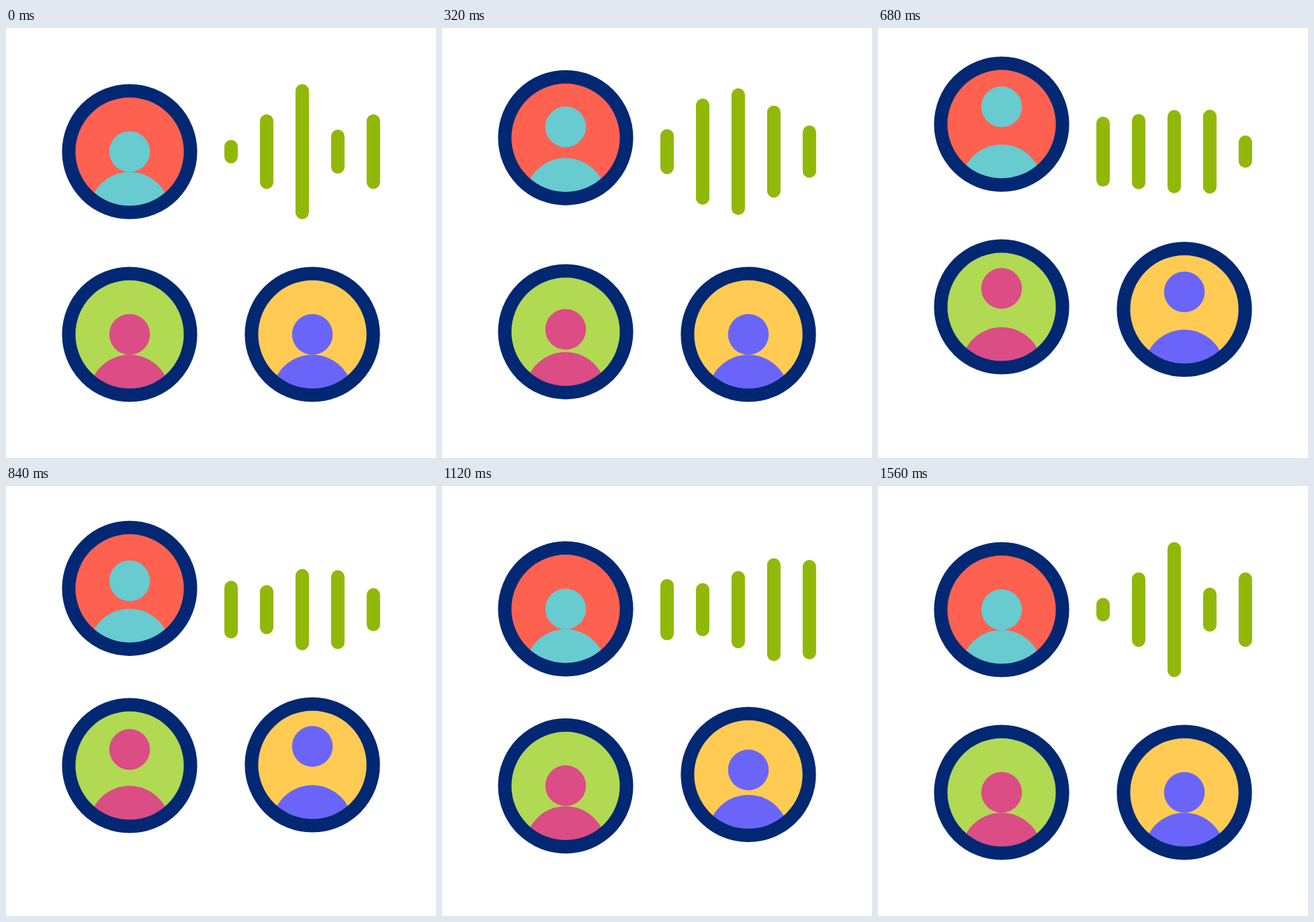
Animation, 640 px wide and 640 px high, one loop 1.6 s. Source, as an HTML page:

```html
<!DOCTYPE html>
<html lang="en">
<head>
<meta charset="utf-8">
<title>Voices</title>
<style>
  html, body { margin: 0; width: 100%; height: 100%; overflow: hidden; background: #fff; }
  svg { display: block; width: 100%; height: 100%; }
</style>
</head>
<body>
<svg id="stage" viewBox="0 0 640 640">
  <defs><clipPath id="disc"><circle r="81"/></clipPath></defs>
</svg>
<script>
const LOOP = 1600, STEP = 40, MID = 184;
const NAVY = '#022873', GREEN = '#91b808';
const stage = document.getElementById('stage');

function add(parent, tag, attrs) {
  const el = document.createElementNS('http://www.w3.org/2000/svg', tag);
  for (const key in attrs) el.setAttribute(key, attrs[key]);
  return parent.appendChild(el);
}

function avatar(x, y, back, fill, delay) {
  const group = add(stage, 'g', {});
  const inner = add(group, 'g', { 'clip-path': 'url(#disc)' });
  add(inner, 'circle', { r: 82, fill: back });
  add(inner, 'circle', { cy: 90.7, r: 60.4, fill });
  const head = add(inner, 'circle', { r: 30.3, fill });
  add(group, 'circle', { r: 90.6, fill: 'none', stroke: NAVY, 'stroke-width': 20 });
  return { group, head, x, y, delay };
}

const avatars = [
  avatar(184, 184, '#ff6150', '#67cbd0', 0),
  avatar(184, 456, '#b1d952', '#dc4c85', 120),
  avatar(456, 456, '#ffcb52', '#6a65f8', 240)
];

// Bar heights at the shared key times
const keys = [40, 320, 520, 840, 1000, 1240, 1560];
const bars = [
  [35, 67, 119.5, 86, 115, 56.5, 35],
  [111, 158, 154, 73, 77, 82.5, 111],
  [201, 188.5, 134, 121, 102, 138.5, 201],
  [65.5, 137, 139, 117.5, 138, 157, 65.5],
  [111, 78, 62, 64, 142, 134, 111]
].map((heights, i) => ({
  heights,
  el: add(stage, 'rect', { x: 325 + i * 52.95, width: 20, rx: 10, fill: GREEN })
}));

// Cubic bezier (.5, 0, .5, 1)
function ease(u) {
  if (u <= 0) return 0;
  if (u >= 1) return 1;
  let lo = 0, hi = 1;
  for (let i = 0; i < 24; i++) {
    const s = (lo + hi) / 2;
    if (1.5 * s * (1 - s) + s * s * s < u) lo = s; else hi = s;
  }
  return lo * lo * (3 - 2 * lo);
}

const ramp = (t, from, to) => ease((t - from) / (to - from));
const lift = t => 41 * (ramp(t, 91, 547) - ramp(t, 651, 1191));
const nod = t => 27.4 * (ramp(t, 80, 520) - ramp(t, 600, 1040));

function slope(v, i) {
  if (i === 0 || i === keys.length - 1) return 0;
  const a = keys[i] - keys[i - 1], b = keys[i + 1] - keys[i];
  return ((v[i] - v[i - 1]) / a * b + (v[i + 1] - v[i]) / b * a) / (a + b);
}

function curve(v, t) {
  const last = keys.length - 1;
  if (t <= keys[0]) return v[0];
  if (t >= keys[last]) return v[last];
  let i = 0;
  while (t > keys[i + 1]) i++;
  const h = keys[i + 1] - keys[i], u = (t - keys[i]) / h, w = 1 - u;
  return v[i] * w * w * (1 + 2 * u) + v[i + 1] * u * u * (3 - 2 * u)
    + h * u * w * (w * slope(v, i) - u * slope(v, i + 1));
}

function draw(t) {
  for (const a of avatars) {
    const local = t - a.delay;
    a.group.setAttribute('transform', `translate(${a.x} ${a.y - lift(local)})`);
    a.head.setAttribute('cy', -nod(local));
  }
  for (const bar of bars) {
    const h = curve(bar.heights, t);
    bar.el.setAttribute('y', MID - h / 2);
    bar.el.setAttribute('height', h);
  }
}

const start = performance.now();
function tick() {
  const t = (performance.now() - start) % LOOP;
  draw(Math.floor(t / STEP) * STEP);
  requestAnimationFrame(tick);
}
tick();
</script>
</body>
</html>
```
